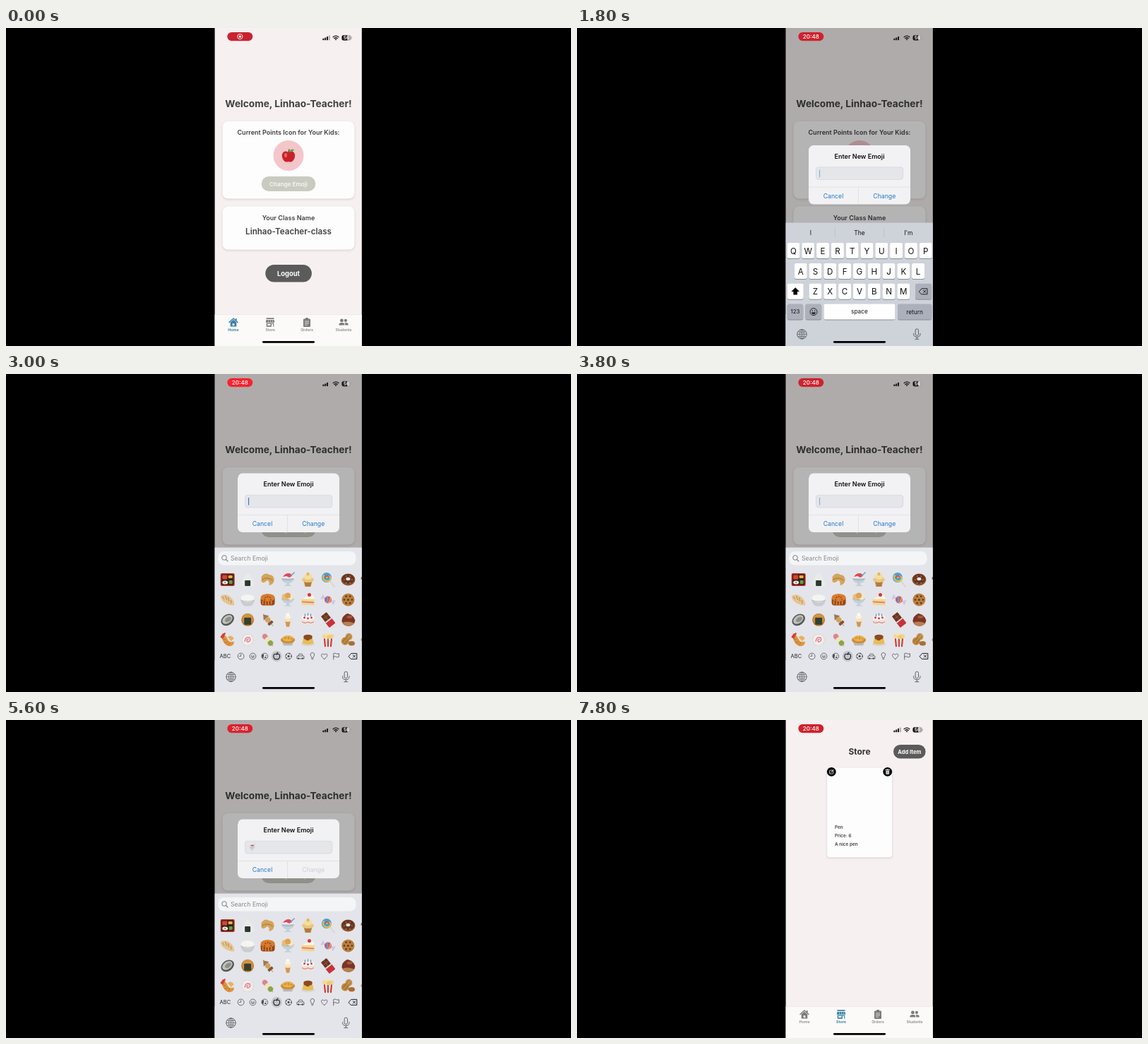
Write an HTML page that moves like this. It is 800 px wide and 450 px high and loops after 8000 ms.

```html
<!DOCTYPE html>
<html lang="en">
<head>
<meta charset="utf-8">
<title>Class app</title>
<style>
html, body { margin: 0; width: 100%; height: 100%; overflow: hidden; background: #000; }
svg { display: block; width: 100%; height: 100%; font-family: Inter, Roboto, sans-serif; }
.card { filter: drop-shadow(0 1px 1.5px rgba(90, 60, 60, .2)); }
</style>
</head>
<body>
<svg id="stage" viewBox="0 0 800 450"></svg>
<script>
const LOOP = 8000, STEP = 200;
const INK = '#404040', BLUE = '#2478c8', USER = 'Linhao-Teacher';

// Markup helpers
const rect = (x, y, w, h, r, fill, more = '') =>
  `<rect x="${x}" y="${y}" width="${w}" height="${h}" rx="${r}" fill="${fill}" ${more}/>`;
const disc = (x, y, r, fill, more = '') => `<circle cx="${x}" cy="${y}" r="${r}" fill="${fill}" ${more}/>`;
const oval = (x, y, rx, ry, fill, more = '') => `<ellipse cx="${x}" cy="${y}" rx="${rx}" ry="${ry}" fill="${fill}" ${more}/>`;
const shape = (d, fill) => `<path d="${d}" fill="${fill}"/>`;
const line = (d, color, w = 1) =>
  `<path d="${d}" fill="none" stroke="${color}" stroke-width="${w}" stroke-linecap="round" stroke-linejoin="round"/>`;
const at = (x, y, body, s = 1) => `<g transform="translate(${x} ${y}) scale(${s})">${body}</g>`;
const turn = (deg, body) => `<g transform="rotate(${deg})">${body}</g>`;
const group = (id, body) => `<g id="${id}">${body}</g>`;
// y is the middle of the capitals
const text = (s, x, y, size, weight = 400, fill = INK, anchor = 'middle') =>
  `<text x="${x}" y="${y + size * .36}" font-size="${size}" font-weight="${weight}" fill="${fill}" text-anchor="${anchor}">${s}</text>`;
const dots = (n, r, size, fill) => Array.from({ length: n }, (_, i) =>
  disc(r * Math.cos(i * 6.283 / n), r * Math.sin(i * 6.283 / n), size, fill)).join('');

// Food drawings, about 20 units wide around 0,0
const glass = shape('M-9 -2H9Q8 4 2 5V7L6 9H-6L-2 7V5Q-8 4 -9 -2Z', '#c3d0d8') + line('M-8 -1Q0 2 8 -1', '#8c9fac', .8);
const apple = shape('M0 -5C5 -9 10 -5 9 1C8 7 4 10 0 8C-4 10 -8 7 -9 1C-10 -5 -5 -9 0 -5Z', '#c9202b')
  + oval(-4, -1, 2, 3, '#ea6460') + line('M0 -4Q0 -7 1 -9', '#6b4325', 1.4) + shape('M1 -6Q3 -11 8 -9Q6 -5 1 -6Z', '#6aa13d');
const sherbet = glass + shape('M-8 -2Q-7 -8 0 -9Q7 -8 8 -2Z', '#f3e9ec')
  + shape('M-7 -4Q-4 -9 1 -9Q5 -9 6 -5L2 -3L-2 -5Z', '#df4756') + line('M4 -5L9 -10', '#6f9cba', 1.5);
const skewer = body => turn(-40, line('M0 -10V11', '#c9a267', 1.2) + body);

const foods = [
  rect(-10, -9, 20, 18, 2, '#b32d24') + rect(-8.5, -7.5, 17, 15, 1, '#33221d') + rect(-7.5, -6.5, 7, 6, 1, '#d9432f')
    + rect(1, -6, 6, 4, 1, '#e7b13e') + oval(-3.5, 4, 4, 2.5, '#f3f2ec') + rect(2, 1, 5, 5, 1, '#649e42') + disc(-3.5, 4, 1, '#d43b38'),
  shape('M0 -9Q3 -9 9 4Q11 9 7 9H-7Q-11 9 -9 4Q-3 -9 0 -9Z', '#e9ebe9') + rect(-4, 1, 8, 8, 1, '#2d3731'),
  shape('M-9 -4Q-4 -11 2 -7Q9 -7 9 1Q8 7 2 8Q3 2 -1 1Q-5 6 -9 3Z', '#d4a45a') + line('M-8 0Q0 -5 7 1', '#a87533'),
  sherbet,
  shape('M-6 2H6L4 10H-4Z', '#c28b4a') + line('M-3 3L-2 9M0 3V9M3 3L2 9', '#935f29', .8)
    + oval(0, 0, 8.5, 4, '#e8c77e') + oval(0, -4, 6, 4, '#f4dda1') + disc(0, -8, 2.2, '#e4b755'),
  line('M2 1L9 10', '#d7d6d0', 1.8) + disc(-2, -3, 7, '#4aa0cf') + line('M-2 -3Q2 -7 4 -2Q3 3 -3 2Q-9 -1 -6 -6', '#ecc33f', 2)
    + line('M-4 -3Q-2 -7 1 -4', '#d94c68', 1.8),
  oval(0, 0, 10, 8.5, '#8c532f') + oval(0, -1, 8.8, 7, '#67351f') + oval(0, -1, 3, 2.2, '#e3e5ea') + dots(6, 5.5, .7, '#d6a067'),
  shape('M-10 -5Q-3 -10 5 -3Q11 3 9 8Q2 8 -4 4Q-9 1 -10 -5Z', '#e6c592') + line('M-7 -4L-5 -1M-3 -5L-1 0M1 -3L2 2M5 1L5 5', '#b48549'),
  shape('M-10 -1H10Q9 7 4 9H-4Q-9 7 -10 -1Z', '#c9ccd0') + oval(0, -2, 9.5, 5.5, '#f4f4f1') + line('M-9 1Q0 4 9 1', '#aeb3b8', .8),
  rect(-10, -5, 20, 13, 4, '#9a4718') + oval(0, -3, 10, 5.5, '#d87c2d') + dots(8, 4.5, 1, '#8f4218') + line('M-7 2V6M-3 3V7M1 3V7M5 2V6', '#e0903e', 1.4),
  glass + disc(-4, -4, 4.5, '#e9bd73') + disc(4, -4, 4.5, '#f5e6c3') + disc(0, -6, 4, '#dea256'),
  shape('M-9 -1L5 -7Q9 -5 9 0V8L-9 7Z', '#f3d78a') + shape('M-9 -1L5 -7Q9 -5 9 -1Z', '#fbf6ef') + line('M-8 3L8 4', '#de7886', 1.7) + disc(2, -7, 2.5, '#d93438'),
  turn(25, shape('M-10 -4L-4 0L-10 4ZM10 -4L4 0L10 4Z', '#d1c4e4') + disc(0, 0, 5, '#d84d76')
    + line('M-3 -3Q1 0 -1 4', '#52a8cd', 2) + line('M2 -4Q4 0 2 4', '#e9b444', 1.6)),
  disc(0, 0, 9, '#bb7f3d') + dots(6, 5.5, 1.3, '#623a20') + disc(0, 0, 1.5, '#62391f'),
  turn(-35, oval(0, 0, 10, 7.5, '#55565a') + oval(0, -.5, 8, 5.3, '#bfc0b8') + oval(1, 0, 5, 3, '#8d9086')),
  disc(0, 0, 9, '#bf782e') + disc(0, -1, 7.5, '#d49343') + rect(-5, -3, 10, 10, 1, '#34402f'),
  skewer(shape('M0 -10L5 -3H-5Z', '#96785c') + disc(0, 0, 3.8, '#d4a15b') + rect(-4, 4, 8, 4, 1, '#815436')),
  shape('M-4 1H4L2 10H-2Z', '#d4964a') + oval(0, 0, 5.5, 3, '#f1e2c4') + oval(0, -4, 4.2, 3, '#faf1de') + oval(0, -7.5, 2.3, 2.3, '#fffaf0'),
  rect(-9, -3, 18, 11, 3, '#ede5dc') + oval(0, -3, 9, 3.5, '#fcfaf6') + line('M-8 3Q-4 6 0 3Q4 6 8 3', '#dc8f98', 1.4)
    + line('M-4 -8V-5M0 -9V-6M4 -8V-5', '#6195bb', 1.3) + disc(-5, -3, 1.5, '#d63c41') + disc(0, -2, 1.5, '#d63c41') + disc(5, -3, 1.5, '#d63c41'),
  turn(-38, rect(-5, -10, 10, 11, 1, '#6a3520') + line('M0 -9V0M-4 -5H4', '#8d533a') + rect(-5.5, 0, 11, 10, 1, '#c9323a') + rect(-5.5, 0, 11, 2, 0, '#d9d6d4')),
  shape('M-9 2Q-9 -5 -1 -9Q8 -7 10 1Q9 8 1 9Q-7 9 -9 2Z', '#7c3424') + shape('M-8 4Q0 1 9 5Q5 9 1 9Q-5 9 -8 4Z', '#b98052') + oval(2, -4, 4, 2, '#a25a40'),
  shape('M-9 -6Q-3 -9 0 -1Q3 5 9 2Q10 8 3 9Q-6 8 -9 -6Z', '#dd9440') + line('M-6 -8L-9 -4M-4 -9L-7 -3', '#d64032', 2.3)
    + shape('M0 -4Q5 -8 9 -2L5 2Z', '#e9b15e') + line('M-6 -1L-3 0M-4 4L0 3M1 7L3 4', '#b9692b', .9),
  dots(9, 7.2, 2.4, '#e3ddd9') + disc(0, 0, 7.5, '#f3eeea') + line('M-4 2Q-3 -5 3 -3Q5 2 0 3Q-3 0 1 -1', '#de7f96', 1.5),
  skewer(disc(0, -6, 3.8, '#dc858d') + disc(0, 0, 3.8, '#eee5bd') + disc(0, 6, 3.8, '#8ba64a')),
  shape('M-9 1H9L6 8H-6Z', '#b7b9b8') + oval(0, 0, 10, 5, '#cf8a32') + oval(0, -2, 8, 4.2, '#e9b14a') + line('M-5 -2L-2 -3M1 -4V-1M4 -2L6 -1', '#b06a20', .9),
  oval(0, 6, 10, 3, '#d8d8d5') + shape('M-6 -5H6L8 5Q0 8 -8 5Z', '#e8bc58') + oval(0, -5, 6, 2.5, '#8b4a20') + shape('M-6 -5Q-6 0 -4 -1Q0 3 3 -1Q6 0 6 -5Z', '#8b4a20'),
  shape('M-7 -3H7L5 10H-5Z', '#f1eeea') + line('M-5 -1L-4 9M0 -1V9M5 -1L4 9', '#d13a37', 2.2)
    + disc(-5, -5, 3, '#f1d993') + disc(0, -7, 3.3, '#f5e4ad') + disc(5, -5, 3, '#efd387') + disc(1, -4, 3, '#eccb76'),
  turn(40, oval(-2, -4, 5, 5, '#c79450') + oval(-2, 4, 5.5, 5.5, '#bd873f') + line('M-4 -6V7M0 -6V7', '#8e5f2a', .8)) + oval(5, 5, 4.5, 3.2, '#a96f35')
];

// Interface icons
const icons = {
  Home: line('M-6 0L0 -5.5L6 0', 'currentColor', 1.5) + shape('M-4.3 0L0 -3.8L4.3 0V6H-4.3Z', 'currentColor')
    + rect(3, -5.5, 1.6, 3.5, 0, 'currentColor') + rect(-1.5, 1.5, 3, 3.2, 1, '#ececec'),
  Store: rect(-5.5, -6.2, 11, 1.8, .3, 'currentColor') + shape('M-5.5 -3.6H5.5L6.3 .2H-6.3Z', 'currentColor')
    + line('M-2.5 -3V0M.5 -3V0M3.3 -3V0', '#eee', .5) + shape('M-5.3 1H5.3V6.2H-5.3ZM-3.8 2.2V4.6H.6V2.2ZM2 2.2V6.2H4.2V2.2Z" fill-rule="evenodd', 'currentColor'),
  Orders: rect(-5, -5, 10, 11.4, 1.2, 'currentColor') + rect(-2, -6.5, 4, 3, 1, 'currentColor') + line('M-2.7 -1.5H2.7M-2.7 1H2.7M-2.7 3.5H1', '#eee', .9),
  Students: disc(-2.6, -2.6, 2.4, 'currentColor') + shape('M-6.6 4V2.5Q-6 .5 -2.6 .5Q1 .5 1.3 2.5V4Z', 'currentColor')
    + disc(2.9, -2.6, 2.1, 'currentColor') + shape('M2.2 4V2Q2 1 1.4 .6Q6.1 .2 6.6 2.5V4Z', 'currentColor')
};
const GREY = '#5d6066';
const globe = disc(0, 0, 6.7, 'none', `stroke="${GREY}"`) + oval(0, 0, 3, 6.7, 'none', `stroke="${GREY}" stroke-width=".8"`)
  + line('M-6.5 0H6.5M0 -6.5V6.5M-5.2 -3.5Q0 -1.8 5.2 -3.5M-5.2 3.5Q0 1.8 5.2 3.5', GREY, .8);
const mic = rect(-2.2, -7.5, 4.4, 9.5, 2.2, 'none', `stroke="${GREY}"`) + line('M-4.7 -1V0Q-4.5 4 0 4Q4.5 4 4.7 0V-1M0 4V7M-2.5 7H2.5', GREY);
const erase = line('M-6 0L-2.5 -4H5.5V4H-2.5ZM0 -1.7L3.4 1.7M3.4 -1.7L0 1.7', '#222');
const smile = disc(0, 0, 5, 'none', 'stroke="#222"') + disc(-1.8, -1.5, .8, '#222') + disc(1.8, -1.5, .8, '#222') + shape('M-3 .6H3Q2.4 3.5 0 3.5Q-2.4 3.5 -3 .6Z', '#222');

function tabBar() {
  const tabs = Object.keys(icons).map((name, i) => {
    const x = 322 + i * 52;
    return group('tab' + name, at(x, 416.5, icons[name]) + text(name, x, 426.8, 5.4, 500, 'currentColor'));
  });
  return rect(295, 405.5, 210, 45, 0, '#fbfaf9') + rect(295, 405.3, 210, .5, 0, '#e4dfdf') + tabs.join('');
}

function homePage() {
  return text(`Welcome, ${USER}!`, 400, 106.7, 13.7, 700)
    + rect(306.5, 132, 187, 109.5, 8, '#fdfdfd', 'class="card"')
    + text('Current Points Icon for Your Kids:', 400, 148.2, 9, 600)
    + disc(400, 180.6, 21.5, '#f3c6ca')
    + group('oldIcon', at(400, 181, apple)) + group('newIcon', at(400, 181, sherbet, .9))
    + rect(361.7, 210, 76.6, 21, 10.5, '#c9cbc0') + text('Change Emoji', 400, 220.6, 8.1, 600, '#f7f7f3')
    + rect(306.5, 252.3, 187, 61.5, 8, '#fdfdfd', 'class="card"')
    + text('Your Class Name', 400, 268.8, 9.05, 600)
    + text(USER + '-class', 400, 287.8, 11.6, 600)
    + rect(367.3, 335, 65.6, 24.5, 12.2, '#5b5b5b') + text('Logout', 400, 347.4, 9.4, 700, '#fff');
}

function storePage() {
  const pencil = rect(-2.6, -2.2, 5, 5, .8, 'none', 'stroke="#fff" stroke-width=".8"') + line('M-.6 .8L2.8 -2.8', '#fff');
  const bin = rect(-2.3, -1.6, 4.6, 5, .6, '#fff') + line('M-3 -2.6H3M-1 -3.4H1', '#fff', .9) + line('M-.8 -.4V2.2M.8 -.4V2.2', '#000', .5);
  return text('Store', 400, 45.2, 11.9, 700, '#333')
    + rect(448, 35, 45.6, 19.6, 9.8, '#5b5b5b') + text('Add Item', 470.8, 44.8, 7.5, 700, '#fff')
    + rect(354.2, 67.6, 91.8, 126.6, 4, '#fdfdfd', 'class="card"')
    + disc(360.3, 73.3, 6.4, '#000') + at(360.3, 73.3, pencil) + disc(439.7, 73.3, 6.4, '#000') + at(439.7, 73.3, bin)
    + ['Pen', 'Price: 6', 'A nice pen'].map((s, i) => text(s, 365, 151.8 + i * 11.9, 6.4, 600, INK, 'start')).join('');
}

function statusBar() {
  const bars = [2.4, 3.8, 5.2, 6.6].map((h, i) => rect(448.4 + i * 2.8, 17.2 - h, 2, h, .5, i < 3 ? '#181818' : '#aaa5a5')).join('');
  const wifi = line('M-3.9 -1.2Q0 -4.4 3.9 -1.2M-2.3 .7Q0 -1.2 2.3 .7', '#181818', 1.3) + disc(0, 2.2, 1, '#181818');
  return `<rect id="pill" x="313.3" y="6" width="36" height="12.2" rx="6.1"/>`
    + group('clock', text('20:48', 331.3, 12.2, 8.1, 500, '#fff'))
    + group('recording', disc(331.3, 12.1, 3.6, 'none', 'stroke="#fff" stroke-width=".9"') + disc(331.3, 12.1, 1.7, '#fff'))
    + bars + at(467, 14, wifi)
    + rect(475.5, 10.3, 13.2, 7.2, 2.2, '#aaa6a6') + shape('M477.7 10.3H483.4V17.5H477.7Q475.5 17.5 475.5 15.3V12.5Q475.5 10.3 477.7 10.3Z', '#181818')
    + rect(489.2, 12.8, .8, 2.4, .4, '#aaa6a6') + text('56', 482, 14, 6.2, 700, '#fff');
}

function alertBox() {
  return rect(-72, -41.7, 144, 83.4, 7, '#f2f2f5') + text('Enter New Emoji', 0, -26.2, 9.05, 600, '#111')
    + rect(-61.5, -11, 123.2, 17.6, 3.5, '#e5e6e9', 'stroke="#cfd0d4" stroke-width=".6"')
    + group('typed', at(-51.5, -2, sherbet, .43))
    + `<rect id="caret" x="-57" y="-7.3" width="1.1" height="10.6" fill="${BLUE}"/>`
    + rect(-72, 17, 144, .5, 0, '#d2d3d7') + rect(-1.6, 17, .5, 24.7, 0, '#d2d3d7')
    + text('Cancel', -37, 29.7, 8.7, 400, BLUE) + group('change', text('Change', 35.3, 29.7, 8.7, 400, 'currentColor'));
}

function letterKeys() {
  const key = (x, y, w, fill = '#fefefe') => rect(x, y + .9, w, 22, 2.7, '#8b8e95') + rect(x, y, w, 22, 2.7, fill);
  const row = (letters, x, y) => [...letters].map((c, i) =>
    key(x + i * 20.8 - 9, y, 18) + text(c, x + i * 20.8, y + 11.5, 11.6, 400, '#111')).join('');
  const DARK = '#abb0ba';
  return rect(295, 275.6, 210, 180, 0, '#ced2d9')
    + ['I', 'The', "I'm"].map((s, i) => text(s, 330.8 + i * 69.3, 289.5, 8.5, 400, '#111')).join('')
    + rect(365, 283, .6, 13, 0, '#b3b7bf') + rect(434.4, 283, .6, 13, 0, '#b3b7bf')
    + row('QWERTYUIOP', 306.5, 304) + row('ASDFGHJKL', 316.7, 333) + row('ZXCVBNM', 337.5, 361.8)
    + key(297.7, 361.8, 23) + shape('M309.2 367.2L315 373H312V377.6H306.4V373H303.4Z', '#000')
    + key(479, 361.8, 23.2, DARK) + at(490.5, 372.8, erase)
    + key(297.7, 390.6, 22.5, DARK) + text('123', 309, 401.6, 8, 400, '#111')
    + key(323.5, 390.6, 22.7, DARK) + at(335, 401.6, smile)
    + key(349.5, 390.6, 101) + text('space', 400, 401.2, 8.4, 400, '#111')
    + key(454, 390.6, 48.3, DARK) + text('return', 478, 401.6, 8.3, 400, '#111')
    + at(318.5, 433.3, globe) + at(481.3, 433.3, mic);
}

function emojiKeys() {
  const grid = foods.map((f, i) => at(313.7 + i % 7 * 28.45, 291 + Math.floor(i / 7) * 28.4, f)).join('');
  const K = '#4a4c51';
  const ring = disc(0, 0, 4.4, 'none', `stroke="${K}" stroke-width=".8"`);
  const tabs = [
    ring + line('M0 -2.6V0H-2', K, .8),
    ring + line('M-2 1Q0 3.4 2 1Z', K, .8) + disc(-1.5, -1.2, .6, K) + disc(1.5, -1.2, .6, K),
    ring + shape('M-4 -3L-1 -3L-2 3Q-5 2 -4 -3Z', K) + disc(1.8, -1, .7, K) + oval(1, 1.6, 1.4, 1, K),
    disc(0, 0, 7.6, '#c3c6cc') + line('M0 -2.5C4 -5 5.5 0 3.5 3Q2 5 0 4Q-2 5 -3.5 3C-5.5 0 -4 -5 0 -2.5Q0 -4.5 1.8 -5.3', '#1c1c1e', 1.1),
    ring + disc(0, 0, 1.6, K) + dots(5, 3.9, .9, K),
    line('M-5 3V0L-3.2 -.5L-2 -3.2H2.2L3.5 -.5L5 0V3Z M-3 -.5H3', K, .8) + disc(-2.8, 3, 1.2, K) + disc(2.8, 3, 1.2, K),
    line('M-1.2 2C-1.2 0 -2.8 -.5 -2.8 -2.4C-2.8 -5.8 2.8 -5.8 2.8 -2.4C2.8 -.5 1.2 0 1.2 2ZM-1 4H1', K, .8),
    line('M0 4C-7 -.5 -4 -5.5 0 -2.2C4 -5.5 7 -.5 0 4Z', K, .8),
    line('M-3.8 4.6V-3.8Q-1.5 -5 0 -3.8T3.8 -3.8V.8Q1.5 2 0 .8T-3.8 .8', K, .8)
  ].map((icon, i) => at(332.6 + i * 16.87, 399.4, icon)).join('');
  return rect(295, 245.6, 210, 210, 0, '#e3e5ea') + rect(300.3, 251, 195.2, 19.4, 8, '#f4f5f7')
    + disc(309, 260, 3.3, 'none', 'stroke="#7b7d83"') + line('M311.5 262.5L314 265', '#7b7d83', 1.1)
    + text('Search Emoji', 318, 260.8, 8.6, 400, '#85878d', 'start') + grid
    + disc(505, 289, 2.5, '#5b4636') + disc(505, 376, 2.5, '#a8793f')
    + text('ABC', 310.4, 399.2, 7.5, 400, '#222') + tabs + at(491.3, 399.4, erase)
    + at(318.5, 428.6, globe) + at(481.3, 428.6, mic);
}

const stage = document.getElementById('stage');
stage.innerHTML = `<clipPath id="phone"><rect x="295.6" width="208.2" height="450"/></clipPath>`
  + rect(0, 0, 800, 450, 0, '#000') + `<g clip-path="url(#phone)">`
  + rect(295, 0, 210, 450, 0, '#f6f0f0') + group('home', homePage()) + group('store', storePage()) + tabBar()
  + `<rect id="dim" x="295" width="210" height="450"/>` + group('alert', alertBox())
  + group('keyboard', group('letters', letterKeys()) + group('emoji', emojiKeys()))
  + rect(363, 443, 74, 2.7, 1.35, '#000') + statusBar() + '</g>';

const ui = {};
stage.querySelectorAll('[id]').forEach(el => ui[el.id] = el);
const clamp = v => Math.max(0, Math.min(1, v));
const easeOut = v => 1 - (1 - clamp(v)) ** 3;
const mix = (a, b, k) => a + (b - a) * k;
const show = (name, on) => ui[name].style.display = on ? '' : 'none';

function draw(t) {
  const inStore = t >= 7600, emojiMode = t >= 2800, typed = t >= 4600, pressed = t >= 5400;
  show('home', !inStore);
  show('store', inStore);
  show('oldIcon', t < 5800);
  show('newIcon', t >= 5800);
  for (const name in icons) {
    const active = name === (inStore ? 'Store' : 'Home');
    ui['tab' + name].style.color = active ? '#3a82a8' : '#7b7b7b';
    ui['tab' + name].lastChild.setAttribute('font-weight', active ? 700 : 500);
  }

  const pulse = (1 - Math.cos(t * Math.PI / 1000)) / 2;
  ui.pill.setAttribute('fill', `rgb(${mix(202, 247, pulse)}, 34, 46)`);
  show('recording', t < 400);
  show('clock', t >= 400);

  const enter = clamp((t - 800) / 250), leave = clamp((t - 5700) / 350);
  const rise = easeOut((t - 1000) / 450), fall = easeOut((t - 5727) / 700);
  const shown = enter * (1 - leave);
  ui.dim.setAttribute('opacity', .29 * shown);
  ui.alert.setAttribute('opacity', shown);
  const cy = emojiMode ? 182.3 : mix(231.2, 207.8, rise);
  ui.alert.setAttribute('transform', `translate(400 ${cy}) scale(${1 + .18 * (1 - enter)})`);

  show('typed', typed);
  show('caret', rise > 0 && !pressed);
  ui.caret.setAttribute('x', typed ? -46 : -57);
  ui.caret.setAttribute('opacity', .5 + .5 * Math.cos((t - 50) * Math.PI / 500));
  ui.change.style.color = pressed ? '#cdced2' : BLUE;

  show('letters', !emojiMode);
  show('emoji', emojiMode);
  ui.keyboard.setAttribute('transform', `translate(0 ${205 * (1 - rise + fall)})`);
}

const start = performance.now();
function tick() {
  const t = (performance.now() - start) % LOOP;
  draw(Math.floor(t / STEP) * STEP);
  requestAnimationFrame(tick);
}
tick();
</script>
</body>
</html>
```
